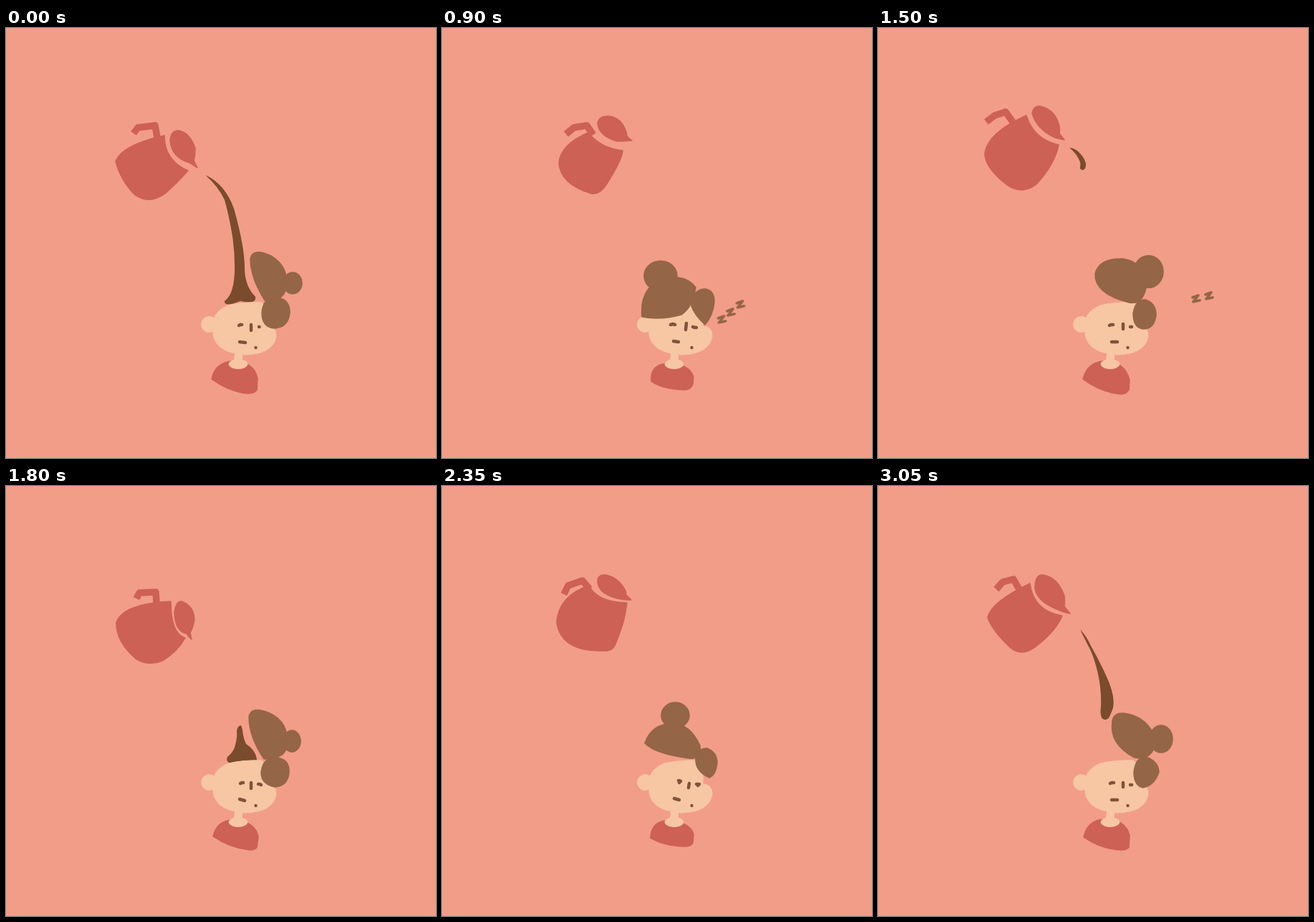
These frames come from a looping animation (600 by 600 pixels, 3.1 s). An HTML page without scripts:

```html
<!DOCTYPE html>
<html lang="en">
<head>
<meta charset="utf-8">
<title>Coffee refill</title>
<style>
html, body { margin: 0; width: 100%; height: 100%; overflow: hidden; background: #f29d88; }
svg { display: block; width: 100vw; height: 100vh; }

.red { fill: #cd6155; stroke: #cd6155; stroke-width: 1.5; }
.skin { fill: #f7c6a3; stroke: #f7c6a3; }
.hair { fill: #946547; stroke: #946547; stroke-width: 1.5; }
.coffee { fill: #7a4b2d; }
.handle, .face, .z { fill: none; stroke-linejoin: round; }
.handle { stroke: #cd6155; stroke-width: 9.5; }
.face { stroke: #80533a; stroke-width: 4.5; stroke-linecap: round; }
.z { stroke: #946547; stroke-width: 3.6; stroke-linecap: round; }

/* Every moving shape holds its own set of poses; one shared timeline morphs them. */
.pose { d: var(--pour); stroke-linejoin: round; animation: day 3.1s infinite; }

@keyframes day {
  0% { d: var(--pour); animation-timing-function: step-end; }
  8.064% { d: var(--pour); animation-timing-function: steps(4); }
  14.516% { d: var(--drain); animation-timing-function: steps(3); }
  19.354% { d: var(--full); animation-timing-function: steps(3); }
  24.193% { d: var(--close); animation-timing-function: steps(3); }
  29.032% { d: var(--sleep); animation-timing-function: steps(7); }
  40.322% { d: var(--inhale); animation-timing-function: steps(5); }
  48.387% { d: var(--drip); animation-timing-function: steps(2); }
  51.612% { d: var(--fall); animation-timing-function: steps(1); }
  53.225% { d: var(--pour); animation-timing-function: steps(3); }
  58.064% { d: var(--drain); animation-timing-function: steps(5); }
  66.129% { d: var(--full); animation-timing-function: steps(6); }
  75.806% { d: var(--close); animation-timing-function: steps(2); }
  79.032% { d: var(--sleep); animation-timing-function: steps(6); }
  88.709% { d: var(--inhale); animation-timing-function: steps(4); }
  95.161% { d: var(--drip); animation-timing-function: steps(2); }
  98.387% { d: var(--fall); animation-timing-function: steps(1); }
  100% { d: var(--pour); }
}

.pot {
  --pour: path("M153 186Q162 163 221 150Q221 185 254 199Q240 215 222 231Q200 247 180 233Q160 213 153 186ZM229 157Q230 143 241 143Q257 146 264 168Q264 178 262 185L267 195Q260 190 256 188Q231 181 229 157Z");
  --drain: path("M154 190Q164 164 230 161Q230 206 250 212Q239 232 218 244Q199 252 181 241Q153 217 154 190ZM235 177Q237 160 245 161Q262 167 263 186Q261 198 257 205L259 214Q256 212 252 206Q236 203 235 177Z");
  --full: path("M159 190Q171 169 219 150Q221 188 261 202Q245 220 227 240Q211 252 194 246Q170 228 159 190ZM230 160Q230 147 241 147Q255 153 260 178Q260 184 259 187L268 197Q258 194 252 190Q233 181 230 160Z");
  --close: path("M160 190Q163 153 205 139Q217 162 258 163Q256 187 243 218Q239 231 226 230Q166 232 160 190ZM217 134Q217 123 228 124Q246 127 256 146Q257 150 257 152L264 159Q254 159 245 157Q219 151 217 134Z");
  --sleep: path("M163 188Q166 162 204 146Q222 168 252 171Q252 183 229 219Q220 233 208 231Q165 218 163 188ZM217 133Q219 122 232 123Q250 124 257 145Q258 149 258 151L265 157Q254 158 244 158Q219 151 217 133Z");
  --inhale: path("M150 176Q153 147 203 124Q218 154 252 160Q248 189 223 219Q204 233 184 221Q150 200 150 176ZM211 121Q212 110 223 110Q245 113 252 135Q253 140 253 144L260 151Q252 151 245 150Q217 141 211 121Z");
  --drip: path("M149 175Q153 146 207 122Q217 155 252 163Q247 190 220 219Q200 233 180 219Q149 195 149 175ZM215 119Q217 108 226 109Q248 114 253 137Q254 143 253 147L260 156Q253 155 247 153Q222 142 215 119Z");
  --fall: path("M153 183Q159 161 212 136Q217 174 257 181Q249 202 219 225Q200 239 184 225Q158 200 153 183ZM219 143Q219 124 229 124Q250 126 260 153Q261 163 260 168L268 178Q260 177 252 173Q222 162 219 143Z");
}
.handle {
  --pour: path("M178 147L184 139L208 136L211 153");
  --drain: path("M182 157L186 149L209 148L210 164");
  --full: path("M181 147L188 140L210 138L213 152");
  --close: path("M170 151L176 139L196 132L206 144");
  --sleep: path("M173 148L184 139L202 136L211 149");
  --inhale: path("M153 133L164 123L180 119L190 133");
  --drip: path("M151 131L163 122L178 117L188 131");
  --fall: path("M165 144L174 134L189 130L197 144");
}
.torso {
  --pour: path("M287 490Q292 466 316 465Q346 465 351 489L350 505Q347 510 337 510Q312 508 287 490Z");
  --drain: path("M289 489Q294 467 316 466Q347 467 352 489L350 504Q348 508 340 508Q312 505 289 489Z");
  --full: path("M289 491Q291 468 312 467Q344 467 353 486L352 497Q349 504 340 504Q312 502 289 491Z");
  --close: path("M291 491Q292 468 314 467Q346 468 351 486L350 498Q347 503 339 503Q309 502 291 491Z");
  --sleep: path("M292 493Q290 469 315 468Q345 468 351 487L350 497Q347 505 338 505Q307 504 292 493Z");
  --inhale: path("M286 489Q292 465 314 464Q345 463 351 490L350 508Q347 514 336 514Q304 509 286 489Z");
  --drip: path("M286 490Q292 466 315 465Q344 465 351 491L350 505Q347 511 338 511Q310 508 286 490Z");
  --fall: path("M287 490Q292 466 316 465Q346 465 351 488L350 504Q347 508 339 508Q312 507 287 490Z");
}
/* cap, bun, fringe */
.hair {
  --pour: path("M341 322Q344 306 370 318Q394 333 391 358Q391 382 361 380Q341 348 341 322ZM387 356a13 15 0 1 1 26 0a13 15 0 1 1-26 0ZM357 397Q359 376 376 376Q396 377 396 397Q394 418 375 419Q357 418 357 397Z");
  --drain: path("M339 322Q342 306 368 317Q395 330 392 360Q392 381 360 381Q339 350 339 322ZM387 356a12 15 0 1 1 24 0a12 15 0 1 1-24 0ZM356 400Q358 379 376 379Q396 380 395 400Q393 419 375 420Q356 416 356 400Z");
  --full: path("M324 330Q335 312 362 317Q386 325 389 349Q382 385 356 383Q336 368 324 330ZM370 334a20 21 0 1 1 40 0a20 21 0 1 1-40 0ZM361 397Q361 377 377 378Q391 378 392 396Q386 412 366 419Q361 412 361 397Z");
  --close: path("M283 359Q292 332 322 331Q346 332 360 362Q362 382 345 380Q298 374 283 359ZM306 320a19.5 18 0 1 1 39 0a19.5 18 0 1 1-39 0ZM354 380Q358 365 370 366Q384 372 384 386Q382 404 373 407Q353 398 354 380Z");
  --sleep: path("M279 403Q275 356 318 348Q342 346 354 362Q350 390 334 400Q306 408 279 403ZM282 346a23 21 0 1 1 46 0a23 21 0 1 1-46 0ZM348 388Q350 364 367 364Q380 366 380 382Q378 402 367 414Q352 400 348 388Z");
  --inhale: path("M279 402Q275 355 318 347Q342 345 355 362Q350 390 334 400Q306 407 279 402ZM285 344a23 21 0 1 1 46 0a23 21 0 1 1-46 0ZM348 388Q350 364 367 364Q380 366 381 383Q379 402 367 414Q352 400 348 388Z");
  --drip: path("M303 343Q308 321 342 322Q366 325 376 352Q372 388 350 383Q302 371 303 343ZM357 340a20 22 0 1 1 41 0a20 22 0 1 1-41 0ZM356 398Q359 379 373 379Q388 384 388 400Q386 419 372 420Q356 420 356 398Z");
  --fall: path("M327 328Q330 311 356 320Q382 330 387 356Q385 383 358 379Q322 360 327 328ZM379 353a16 19 0 1 1 32 0a16 19 0 1 1-32 0ZM357 400Q359 378 374 378Q391 384 392 399Q386 418 369 421Q357 417 357 400Z");
}
.coffee {
  --in-head: path("M328 392Q328 392 328 392Q328 392 328 392Q328 392 328 392Q328 392 328 392Q328 392 328 392Q328 392 328 392Q328 392 328 392Q328 392 328 392Z");
  --in-pot: path("M267 167Q267 167 267 167Q267 167 267 167Q267 167 267 167Q267 167 267 167Q267 167 267 167Q267 167 267 167Q267 167 267 167Q267 167 267 167Z");
  --pour: path("M278 205Q306 218 318 252Q333 305 333 335Q333 360 348 375Q350 386 327 381Q304 390 305 381Q320 370 319 330Q319 290 305 240Q297 222 278 205Z");
  --drain: path("M327 334Q329 334 330 341Q331 352 335 360Q350 370 350 384Q340 384 330 387Q304 390 309 378Q318 371 320 361Q323 350 322 342Q323 335 327 334Z");
  --full: path("M330 369Q333 369 335 374Q339 375 344 377Q348 380 346 384Q338 387 328 387Q307 388 309 382Q311 375 315 376Q320 377 323 375Q326 369 330 369Z");
  --close: var(--in-head);
  --sleep: var(--in-head);
  --inhale: var(--in-pot);
  --drip: path("M267 167Q275 168 280 173Q287 180 289 186Q291 191 289 196Q286 199 285 198Q281 197 282 194Q283 190 282 187Q279 180 276 176Q272 171 267 167Z");
  --fall: path("M282 200Q292 211 297 223Q309 244 318 264Q335 300 325 317Q322 327 316 326Q309 325 311 308Q312 285 307 262Q302 241 296 228Q290 217 282 200Z");
}
/* eye, nose, eye, mouth */
.face {
  --pour: path("M325 415L327 414L329 414M342 414L342 422M353 417L353 417L353.5 417M326 438L334 439");
  --drain: path("M327 415L329 414L331 414M342 414L342 422M352 416L354 416L356 417M326 437L333 439");
  --full: path("M328 411L331 413L328 414M344 415L344 422M355 416L359 418L356 419M327 437L334 438");
  --close: path("M330 411L333 412L331 414M345 415L344 421M355 416L359 416L357 418M324 436L331 438");
  --sleep: path("M319 414L322 413L325 414M341 412L340 421M350 417L353 418L355 418M323 437L330 438");
  --inhale: var(--sleep);
  --drip: path("M323 415L325 414L328 414M342 413L342 420M352 417L353 417L354 417M326 438L334 438");
  --fall: path("M324 415L326 414L329 414M342 414L342 420M352 417L353 417L354 417M326 438L334 438");
}

.z { animation: drift 3.1s infinite, snore 3.1s step-end infinite; }
.z.first { animation-name: drift, snore-short; }
.z.first { --from: translate(390.5px, 407px); --to: translate(428px, 381px); }
.z.second { --from: translate(403px, 397px); --to: translate(444px, 378px); }
.z.third { --from: translate(416.5px, 386px); --to: translate(462px, 374px); }

@keyframes drift {
  0% { transform: var(--from); animation-timing-function: step-end; }
  29.032% { transform: var(--from); animation-timing-function: steps(12); }
  48.387% { transform: var(--to); animation-timing-function: step-end; }
  79.032% { transform: var(--from); animation-timing-function: steps(10); }
  95.161%, 100% { transform: var(--to); }
}
@keyframes snore {
  0%, 50%, 95.161%, 100% { opacity: 0; }
  27.419%, 79.032% { opacity: 1; }
}
@keyframes snore-short {
  0%, 43.548%, 90.322%, 100% { opacity: 0; }
  27.419%, 79.032% { opacity: 1; }
}
</style>
</head>
<body>
<svg viewBox="0 0 600 600">
  <defs><path id="zed" d="M-5-2L3-5L-4 4L5 2"/></defs>
  <path class="pose handle"/>
  <path class="pose red pot"/>
  <path class="pose red torso"/>
  <path class="pose coffee"/>
  <g class="skin">
    <path d="M289 408Q293 394 310 387Q332 382 357 383Q365 390 364 416Q377 416 377 430Q373 455 334 456Q293 453 289 428Z"/>
    <circle cx="283.5" cy="413.5" r="11"/>
    <path d="M320 452H330L329 466H318Z"/>
    <ellipse cx="324" cy="469" rx="13" ry="6.5"/>
  </g>
  <path class="pose face"/>
  <circle cx="348.5" cy="446" r="2.2" fill="#80533a"/>
  <path class="pose hair"/>
  <use class="z first" href="#zed"/>
  <use class="z second" href="#zed"/>
  <use class="z third" href="#zed"/>
</svg>
</body>
</html>
```
